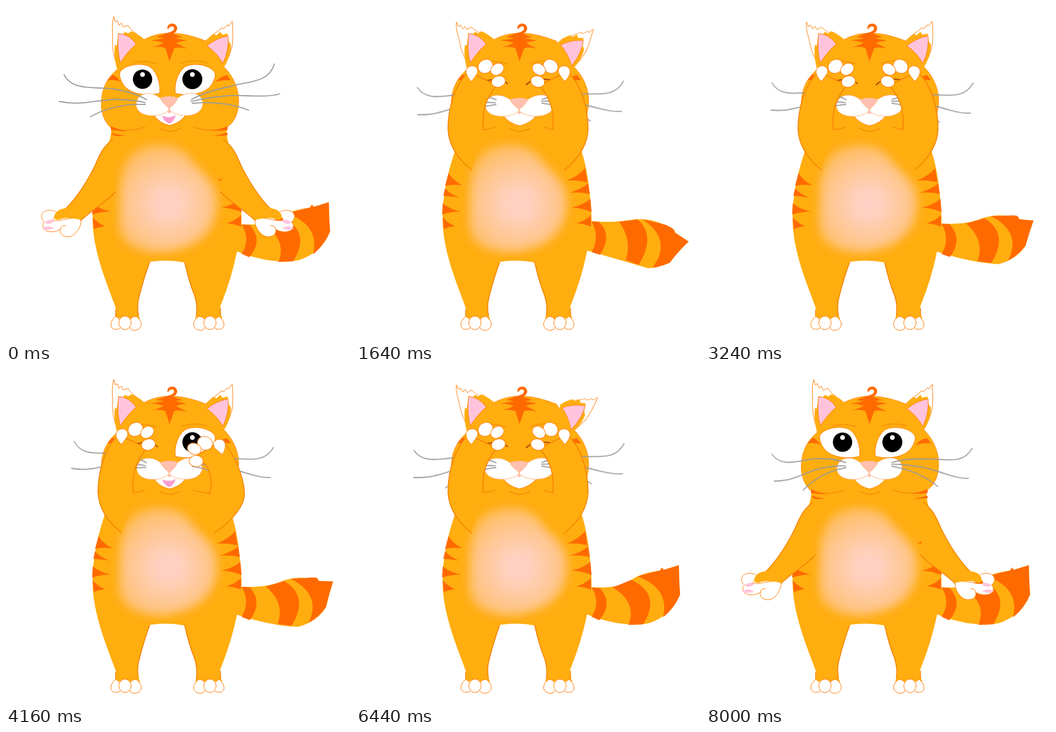
An HTML page without scripts for the animation above (10000 ms loop, 587 by 572 pixels).

```html
<!DOCTYPE html>
<html lang="en">
<head>
<meta charset="utf-8">
<title>Peekaboo cat</title>
<style>
html, body { margin: 0; width: 100%; height: 100%; overflow: hidden; background: #fff; }
svg { display: block; width: 100vw; height: 100vh; }

.fur { fill: #ffad0f; }
.dark { fill: #ff6a00; }
.white { fill: #fff; }
.pink { fill: #ffc4dc; }
.edge { stroke: #ff7d0a; stroke-width: 1; stroke-linejoin: round; }
.soft { stroke: #ffa35c; stroke-width: .8; stroke-linejoin: round; }
.line { fill: none; stroke: #f57f05; stroke-width: 1.5; stroke-linecap: round; }
.whisker { fill: none; stroke: #999; stroke-width: 1.8; stroke-linecap: round; }

.tail, .bands, .arm, .hand, .palm, .earL, .earR, .tipR, .whiskL, .whiskR, .muzzle, .eyeL, .eyeR, .tongue {
  animation: 10s linear infinite;
}

/* Tail */
.tail {
  --up: path("M392,372 C430,375 450,372 470,360 C485,350 500,347 519,344 L522,339 L525,343 L551,335 Q551,360 553,385 Q540,420 500,434 C470,440 430,434 392,418");
  --mid: path("M392,359 C430,369 450,366 470,361 C490,357 510,359 527,364 L530,361 L533,365 L560,375 Q550,392 541,418 Q520,438 495,440 C465,440 430,428 392,410");
  --low: path("M392,369 C430,372 455,368 475,366 C500,365 520,370 545,388 L549,391 L550,397 L571,414 Q552,428 533,447 Q515,451 500,451 C475,440 440,430 392,420");
  d: var(--up); animation-name: wag;
}
.bands {
  --up: path("M402,373 L416,374 Q440,400 415,429 L402,423 Q418,398 402,373Z M438,373 L470,360 Q522,385 490,436 L465,437 Q480,398 438,373Z M480,354 L519,344 L522,339 L525,343 L551,335 Q551,360 553,385 Q543,409 524,424 Q536,375 480,354Z");
  --mid: path("M402,362 L414,366 Q440,385 412,417 L402,412 Q418,388 402,362Z M440,367 L474,361 Q515,385 483,440 L458,435 Q476,400 440,367Z M473,360 L527,364 L530,361 L533,365 L560,375 Q550,392 541,418 Q530,430 515,438 Q530,385 473,360Z");
  --low: path("M402,370 L415,370 Q438,395 418,428 L402,424 Q416,398 402,370Z M453,369 L483,366 Q512,395 482,443 L461,433 Q470,400 453,369Z M496,366 L530,378 L545,388 L550,397 L571,414 Q552,428 533,447 Q518,451 502,451 Q546,405 496,366Z");
  d: var(--up); animation-name: wag;
}
@keyframes wag {
  0%, 38.4%, 55.2%, 64.4%, 80%, 100% { d: var(--up); }
  7.6%, 19.2%, 72.2% { d: var(--mid); }
  15.2%, 23.2%, 47.5%, 59.8% { d: var(--low); }
}

/* Arms, drawn for the left side and mirrored for the right */
.arm {
  --down: path("M182,228 C160,244 158,262 148,280 C135,305 120,328 100,348 L126,368 C150,345 170,336 186,318");
  --out: path("M180,240 C150,265 115,272 80,255 C55,240 40,215 36,185 L70,178 C82,215 120,225 180,232");
  --cover: path("M197,280 C175,262 158,240 157,210 C157,175 168,135 192,112 L240,135 C222,158 214,178 217,211");
  --peek: path("M197,280 C172,262 146,237 146,212 C148,180 165,140 186,122 L228,148 C206,165 198,185 206,214");
  d: var(--down); animation-name: raise;
}
.arm.peek { animation-name: raisePeek; }
@keyframes raise {
  0%, .4%, 79.6%, 100% { d: var(--down); }
  3.2%, 76.4% { d: var(--out); }
  5.8%, 73.4% { d: var(--cover); }
}
@keyframes raisePeek {
  0%, .4%, 79.6%, 100% { d: var(--down); }
  3.2%, 76.4% { d: var(--out); }
  5.8%, 34%, 59%, 73.4% { d: var(--cover); }
  38%, 49% { d: var(--peek); }
}
.palm { transform-origin: 113px 360px; animation-name: palm; }
@keyframes palm {
  0%, .4%, 79.6%, 100% { transform: none; opacity: 1; }
  3.2%, 76.4% { transform: translate(-60px, -177px) rotate(75deg); opacity: 1; }
  3.21%, 76.39% { transform: translate(-60px, -177px) rotate(75deg); opacity: 0; }
}
.hand { transform-origin: 216px 118px; opacity: 0; animation-name: hand; }
.hand.peek { animation-name: handPeek; }
@keyframes hand {
  0%, 3.2%, 76.4%, 100% { transform: translate(-161px, 60px) rotate(-35deg); opacity: 0; }
  3.21%, 76.39% { transform: translate(-161px, 60px) rotate(-35deg); opacity: 1; }
  5.8%, 73.4% { transform: none; opacity: 1; }
}
@keyframes handPeek {
  0%, 3.2%, 76.4%, 100% { transform: translate(-161px, 60px) rotate(-35deg); opacity: 0; }
  3.21%, 76.39% { transform: translate(-161px, 60px) rotate(-35deg); opacity: 1; }
  5.8%, 34%, 59%, 73.4% { transform: translate(0, 0) rotate(0deg); opacity: 1; }
  38%, 49% { transform: translate(-11px, 22px) rotate(14deg); opacity: 1; }
}

/* Ears */
.earL { transform-origin: 204px 85px; animation-name: earL; }
@keyframes earL {
  0%, 4%, 39%, 41.6%, 58%, 76%, 100% { transform: rotate(0deg) scale(1); }
  7.6%, 33%, 43%, 55.2%, 61%, 73% { transform: rotate(-13deg) scale(.95); }
}
.earR { transform-origin: 352px 92px; animation-name: earR; }
.tipR { transform-origin: 356px 84px; animation-name: tipR; }
@keyframes earR {
  0%, 4%, 22%, 61%, 70%, 100% { transform: rotate(0deg); }
  7.6%, 66% { transform: rotate(36deg); }
  64.4% { transform: rotate(20deg); }
}
@keyframes tipR {
  0%, 4%, 22%, 61%, 70%, 100% { transform: rotate(0deg); }
  7.6%, 66% { transform: rotate(12deg); }
}

/* Face */
.whiskL { transform-origin: 240px 165px; animation-name: whiskL; }
.whiskR { transform-origin: 318px 164px; animation-name: whiskR; }
@keyframes whiskL {
  0% { transform: rotate(0deg) scaleX(1); }
  7.6%, 64.4% { transform: rotate(-9deg) scaleX(.96); }
  23.2% { transform: rotate(-10deg) scaleX(.88); }
  41.6% { transform: rotate(-3deg) scaleX(.86); }
  55.2% { transform: rotate(-9deg) scaleX(.81); }
  80%, 100% { transform: rotate(-13deg) scaleX(.85); }
}
@keyframes whiskR {
  0% { transform: rotate(0deg) scaleX(1); }
  7.6%, 64.4% { transform: rotate(12deg) scaleX(.92); }
  23.2% { transform: rotate(13deg) scaleX(.9); }
  41.6%, 55.2% { transform: rotate(15deg) scaleX(.9); }
  80%, 100% { transform: rotate(16deg) scaleX(.88); }
}
.muzzle { transform-origin: 279px 170px; animation-name: muzzle; }
@keyframes muzzle {
  0% { transform: none; }
  7.6%, 64.4% { transform: translateY(2px) scale(1.04, .95); }
  23.2% { transform: translateY(2px) scale(1.01, .95); }
  41.6%, 55.2%, 80%, 100% { transform: translateY(2px) scale(.98, .96); }
}
.eyeL, .eyeR, .tongue { animation-timing-function: step-end; }
.eyeL { animation-name: eyeL; }
.eyeR { animation-name: eyeR; }
.tongue { animation-name: talk; }
@keyframes eyeL { 0%, 76% { opacity: 1; } 4%, 75% { opacity: 0; } }
@keyframes eyeR { 0%, 36%, 76% { opacity: 1; } 4%, 52% { opacity: 0; } }
@keyframes talk { 0%, 34% { opacity: 1; } 4%, 49%, 100% { opacity: 0; } }
</style>
</head>
<body>
<svg viewBox="0 0 587 572" preserveAspectRatio="none">
  <defs>
    <radialGradient id="glow" gradientUnits="userSpaceOnUse" cx="277" cy="338" r="118">
      <stop offset="0" stop-color="#ffd2ca"/>
      <stop offset=".2" stop-color="#ffd0be"/>
      <stop offset=".6" stop-color="#ffc58a"/>
      <stop offset="1" stop-color="#ffb848"/>
    </radialGradient>
    <filter id="blur" x="-20%" y="-20%" width="140%" height="140%" color-interpolation-filters="sRGB">
      <feGaussianBlur stdDeviation="8"/>
    </filter>
    <g id="palm" class="white edge">
      <path d="M80,366 C95,368 100,362 126,362 C133,370 120,394 106,394 C96,394 91,388 93,381 C85,387 66,388 63,378 C62,373 64,370 66,369 C57,362 60,350 72,349 C84,348 90,353 83,360 Q80,364 80,366Z"/>
      <path d="M66,370 Q74,362 83,367 Q75,375 66,370Z M62,380 Q70,373 82,379 Q72,385 62,380Z" class="pink" stroke="none"/>
      <path d="M93,381 Q94,374 102,375" fill="none"/>
      <path d="M104,345 Q87,346 83,357 Q80,365 90,365 Q102,359 127,365 L132,356Z" class="fur" stroke="none"/>
    </g>
    <g id="hand" class="white edge">
      <path d="M197,129 Q186,118 188,109 Q191,102 200,102 Q210,105 207,115 Q203,121 197,129Z"/>
      <ellipse cx="221" cy="103" rx="13" ry="11.5" transform="rotate(-35 221 103)"/>
      <ellipse cx="241" cy="108" rx="12" ry="9.5" transform="rotate(-35 241 108)"/>
      <ellipse cx="243" cy="129" rx="12" ry="9.5" transform="rotate(-15 243 129)"/>
    </g>
    <g id="foot" class="white edge">
      <path d="M187,530 Q178,538 179,546 Q181,553 189,552 Q198,552 196,541 Q193,532 187,530Z"/>
      <path d="M222,530 Q231,536 231,545 Q229,553 219,554 Q210,553 209,542 Q212,530 222,530Z"/>
      <ellipse cx="203" cy="541" rx="10.5" ry="11.5"/>
    </g>
  </defs>

  <path class="tail fur"/>
  <path class="bands dark"/>

  <path class="fur" d="M180,203 C180,225 175,235 168,250 C155,290 146,330 148,375 C152,430 175,480 187,515 Q190,522 185,533 L229,535 Q222,520 226,500 Q235,465 245,437 Q275,432 305,438 Q312,470 322,495 Q328,515 323,535 L369,533 Q363,520 366,512 Q385,465 394,420 C402,390 403,370 401,345 C398,300 392,270 385,248 C378,235 376,220 376,203Z"/>
  <path class="line" d="M245,438 Q235,465 227,497 Q223,512 226,528 M305,438 Q312,470 322,495 Q327,510 325,528 M366,528 V516 M187,528 V518"/>
  <path fill="url(#glow)" filter="url(#blur)" d="M218,250 C240,232 295,230 314,260 C328,282 358,295 360,330 C362,370 345,393 318,407 C280,425 235,427 206,404 C186,390 195,350 194,320 C194,290 202,264 218,250Z"/>
  <path class="dark" d="M158,285 Q164,297 181,306 Q165,304 152,307Z M152,311 Q160,321 176,327 Q162,325 149,324Z M148,337 Q160,347 179,351 Q163,351 147,356Z M148,361 Q157,371 169,376 Q158,377 150,381Z M391,277 Q380,290 360,298 Q378,297 395,301Z M396,303 Q384,313 364,319 Q382,317 399,321Z M400,329 Q388,340 368,344 Q386,345 402,352Z M401,357 Q391,367 376,371 Q390,372 401,377Z"/>
  <use href="#foot"/>
  <use href="#foot" transform="translate(551) scale(-1 1)"/>

  <!-- head -->
  <path class="fur edge" d="M236,57 Q278,34 342,60 L372,104 C390,122 398,145 397,165 C396,190 385,207 366,211 C345,216 330,209 318,207 Q279,222 238,207 C220,215 190,217 178,207 C165,195 161,175 163,160 C164,140 173,122 190,108Z" stroke-opacity=".8"/>
  <path class="fur" d="M205,204 H350 V222 H205Z"/>
  <path class="line" d="M180,208 Q205,217 237,207 M262,209 Q280,219 297,209 M320,207 Q350,217 377,207 M214,98 Q235,91 257,99 M299,98 Q320,90 342,97" stroke-opacity=".7"/>
  <path class="dark" d="M179,205 Q190,211 205,213 Q190,213 179,212Z M180,216 Q190,220 204,221 Q192,223 183,221Z M378,205 Q367,211 350,213 Q367,213 378,212Z M377,216 Q367,220 355,221 Q367,223 379,220Z"/>
  <path class="dark" d="M195,129 Q189,120 182,117 L173,127 Q185,125 195,129Z M357,130 Q366,120 377,118 L384,127 Q370,125 357,130Z"/>
  <path class="dark" d="M278,45 L301,53 L288,55 L309,59 Q298,60 290,63 L309,73 Q294,69 287,72 L279,94 L272,72 Q263,68 248,71 Q262,67 269,63 Q258,59 246,59 L270,55 L256,53Z"/>
  <path class="dark" d="M274,47 C284,44 289,40 286,36 C283,33 279,36 276,40 C273,32 282,28 288,31 C295,36 293,45 283,48Z"/>

  <path class="earL white edge" d="M188,98 Q180,75 182,50 Q180,30 184,18 L186,27 L190,25 L193,33 L197,29 L200,36 L208,33 Q215,44 232,54 L205,75Z"/>
  <path class="fur" d="M190,110 Q183,85 186,66 L189,68 L192,46 L199,48 L204,44 L208,47 L214,43 Q225,48 236,57 L215,100Z"/>
  <path class="pink edge" d="M192,47 Q210,48 222,65 Q208,77 195,97 Q189,75 192,47Z"/>

  <g class="earR">
    <path class="tipR white edge" d="M340,60 Q350,50 363,42 L368,37 L371,39 L378,32 L380,34 L386,26 Q388,50 386,68 Q382,85 374,100 L350,85Z"/>
    <path class="fur" d="M338,64 Q346,53 355,48 L359,50 L366,44 L369,49 L378,47 L380,60 L384,66 Q384,85 371,106 L345,100Z"/>
    <path class="pink edge" d="M343,68 Q358,55 379,51 Q381,75 370,98 Q360,80 343,68Z"/>
  </g>

  <path d="M259,133 Q246,120 213,130 M290,135 Q304,119 340,128" fill="none" stroke="#a84a08" stroke-width="2"/>
  <g class="eyeL">
    <path class="white edge" d="M195,112 C205,99 235,96 247,105 C258,114 264,133 262,149 C243,154 212,152 200,134 C196,127 192,118 195,112Z"/>
    <circle cx="233" cy="125" r="16.5"/>
    <circle class="white" cx="233" cy="117" r="4"/>
  </g>
  <g class="eyeR">
    <path class="white edge" d="M356,113 C346,99 316,96 304,105 C293,114 287,133 289,149 C308,154 339,152 351,134 C355,127 359,119 356,113Z"/>
    <circle cx="318" cy="125" r="17"/>
    <circle class="white" cx="318" cy="117" r="4"/>
  </g>

  <g class="muzzle">
    <path class="white edge" d="M252,186 Q261,200 279,204 Q297,200 307,186 L279,177Z"/>
    <path class="tongue" fill="#f79fd0" d="M266,187 Q279,193 290,186 Q287,197 279,201 Q270,198 266,187Z"/>
    <path fill="#ffc0b0" d="M262,157 Q279,151 294,157 L284,178 L279,184 L273,178Z"/>
    <path class="white soft" d="M278,178 C262,192 224,191 222,169 C223,147 247,144 263,157 Q268,167 278,174Z"/>
    <path class="white soft" d="M279,178 C295,192 334,191 336,167 C335,146 310,144 293,157 Q289,167 279,174Z"/>
  </g>
  <g class="whisker">
    <path class="whiskL" d="M99,117 C112,146 155,137 185,142 Q220,148 240,160 M91,163 C135,172 165,156 200,160 Q222,161 238,165 M144,189 Q185,166 238,168"/>
    <path class="whiskR" d="M458,99 C448,133 410,128 380,138 Q340,146 316,160 M467,150 C440,158 400,150 370,154 Q340,157 316,163 M414,178 Q375,162 318,166"/>
  </g>

  <g>
    <path class="arm line" style="fill:#ffad0f"/>
    <use href="#palm" class="palm"/>
    <use href="#hand" class="hand"/>
  </g>
  <g transform="translate(553) scale(-1 1)">
    <path class="arm peek line" style="fill:#ffad0f"/>
    <use href="#palm" class="palm"/>
    <use href="#hand" class="hand peek"/>
  </g>
</svg>
</body>
</html>
```
